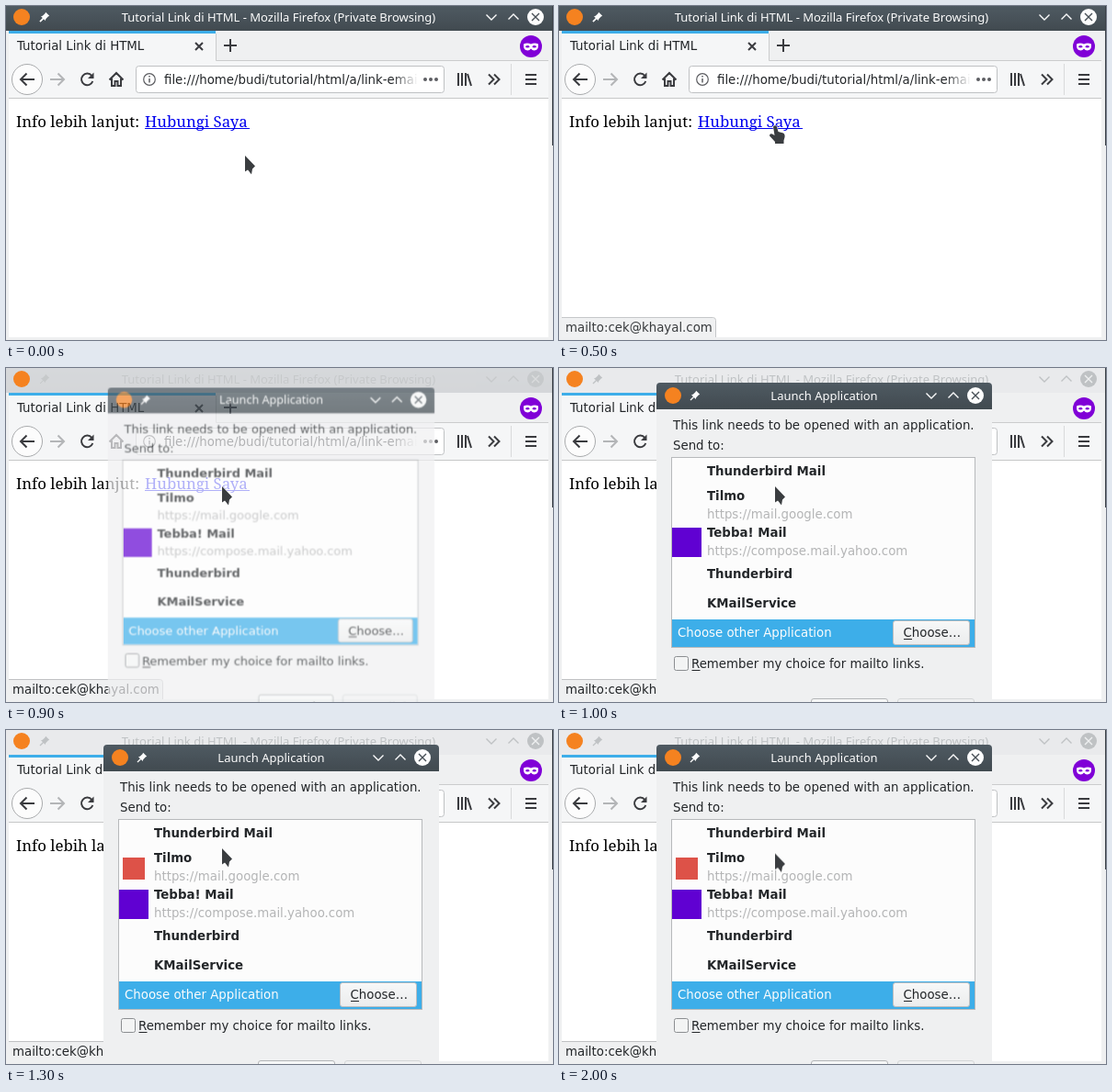
These frames come from a looping animation (595 px wide and 364 px high, 2.1 s). An HTML page:

```html
<!DOCTYPE html>
<html lang="id">
<head>
<meta charset="utf-8">
<title>Tutorial Link di HTML</title>
<style>
html, body { margin: 0; width: 100%; height: 100%; overflow: hidden; background: #eff0f1; }
svg { display: block; width: 595px; height: 364px; }
text { font: 13.33px "DejaVu Sans", sans-serif; fill: #232629; white-space: pre; }
.title { font: 13px "Noto Sans", sans-serif; fill: #fcfcfc; text-anchor: middle; }
.page { font: 16.8px "Noto Serif", serif; fill: #000; }
.link { fill: #00e; }
.bold { font-weight: bold; }
.url { fill: #b4b5b6; }
.light { fill: #fcfcfc; }
.icon { fill: none; stroke: #3a3b3f; stroke-width: 2; }
.deco { fill: none; stroke: #fcfcfc; stroke-width: 1.4; }
.faded .title { fill: #bfc2c4; }
.faded .deco { stroke: #bfc2c4; }
.pointer { fill: #3a3d40; stroke: #fff; stroke-width: 1.2; stroke-opacity: .85; paint-order: stroke; stroke-linejoin: round; }

/* Every change is a hard cut on a 100 ms grid. */
#arrow, #hand, #status, #dialog, #inactive, #mailIcon { animation: 2100ms step-end infinite; }
#arrow { animation-name: arrow; }
#hand { animation-name: hand; }
#status { animation-name: status; }
#dialog { animation-name: dialog; transform-origin: 288.5px 201px; }
#inactive { animation-name: inactive; }
#mailIcon { animation-name: mailIcon; }

@keyframes arrow {
  0% { transform: translate(260px, 163px); opacity: 1; }
  4.76% { transform: translate(249px, 143px); opacity: 1; }
  9.52% { transform: translate(235px, 129px); opacity: 0; }
  38.09% { transform: translate(235px, 129px); opacity: 1; }
  71.42% { transform: translate(235px, 130.5px); opacity: 1; }
  80.95% { transform: translate(235px, 131.5px); opacity: 1; }
  90.47% { transform: translate(235px, 133px); opacity: 1; }
  95.23%, 100% { transform: translate(235px, 134.5px); opacity: 1; }
}
@keyframes hand {
  0% { transform: translate(240px, 118px); opacity: 0; }
  9.52% { transform: translate(240px, 118px); opacity: 1; }
  14.28% { transform: translate(235px, 130px); opacity: 1; }
  38.09%, 100% { transform: translate(235px, 130px); opacity: 0; }
}
@keyframes status {
  0% { opacity: 0; }
  19.04% { opacity: .4; }
  23.8% { opacity: .9; }
  28.57%, 100% { opacity: 1; }
}
@keyframes dialog {
  0% { opacity: 0; transform: scale(.76); }
  38.09% { opacity: .012; transform: scale(.76); }
  42.85% { opacity: .7; transform: scale(.973); }
  47.61%, 100% { opacity: 1; transform: none; }
}
@keyframes inactive {
  0% { opacity: 0; }
  42.85% { opacity: .88; }
  47.61%, 100% { opacity: 1; }
}
@keyframes mailIcon {
  0% { opacity: 0; }
  57.14%, 100% { opacity: 1; }
}
</style>
</head>
<body>
<svg viewBox="0 0 595 364">
  <defs>
    <linearGradient id="bar" x2="0" y2="1">
      <stop stop-color="#4f5a62"/><stop offset="1" stop-color="#414a50"/>
    </linearGradient>
    <linearGradient id="btn" x2="0" y2="1">
      <stop stop-color="#f7f8f8"/><stop offset="1" stop-color="#ebeced"/>
    </linearGradient>
    <linearGradient id="fade">
      <stop stop-color="#fff" stop-opacity="0"/><stop offset="1" stop-color="#fff"/>
    </linearGradient>
    <g id="pin">
      <path d="M1.2-5.2 5.2-1.2 3.8-.4 1.2 2.2 .8 4-4 -.8 -2.2-1.2 .4-3.8Z"/>
      <path d="M-1.2 1.2-5 5" stroke-width="1.3"/>
    </g>
    <g id="arrows">
      <path class="deco" d="M-53.5-2.5-48 3-42.5-2.5M-29.5 2.5-24-3-18.5 2.5"/>
    </g>
  </defs>

  <rect width="595" height="364" fill="#eff0f1"/>

  <!-- Window title bar, active and inactive -->
  <g>
    <rect width="595" height="27" fill="url(#bar)"/>
    <use href="#pin" x="42" y="12" fill="#fcfcfc" stroke="#fcfcfc" stroke-width="0"/>
    <path d="M40.8 13.2 37 17" stroke="#fcfcfc" stroke-width="1.3"/>
    <text class="title" x="296.5" y="17">Tutorial Link di HTML - Mozilla Firefox (Private Browsing)</text>
    <use href="#arrows" x="576" y="12"/>
    <circle cx="576" cy="12" r="9" fill="#fcfcfc"/>
    <path d="M572 8l8 8m0-8-8 8" stroke="#474f56" stroke-width="1.4"/>
  </g>
  <g id="inactive" class="faded">
    <rect width="595" height="27" fill="#e9eaec"/>
    <use href="#pin" x="42" y="12" fill="#bfc2c4"/>
    <path d="M40.8 13.2 37 17" stroke="#bfc2c4" stroke-width="1.3"/>
    <text class="title" x="296.5" y="17">Tutorial Link di HTML - Mozilla Firefox (Private Browsing)</text>
    <path class="deco" d="M522.5 9.5 528 15 533.5 9.5M546.5 14.5 552 9 557.5 14.5"/>
    <circle cx="576" cy="12" r="9" fill="#bfc2c4"/>
    <path d="M572 8l8 8m0-8-8 8" stroke="#eff0f1" stroke-width="1.4"/>
  </g>
  <circle cx="17" cy="12" r="9" fill="#f58220"/>

  <!-- Tabs -->
  <rect x="3" y="27" width="225" height="33" fill="#f5f6f7"/>
  <rect x="3" y="27" width="225" height="3" fill="#3daee9"/>
  <path d="M228.5 30V59.5H590" fill="none" stroke="#cbcccd"/>
  <text x="12" y="48">Tutorial Link di HTML</text>
  <path class="icon" stroke-width="1.6" d="M206 40l8 8m0-8-8 8"/>
  <path class="icon" d="M237 43h14m-7-7v14"/>
  <circle cx="571" cy="44" r="12" fill="#8000d7"/>
  <path d="M563 41.5q4-2 8 0 4-2 8 0 .5 7-4.5 7-2 0-3.5-2-1.5 2-3.5 2-5 0-4.500-7Z" fill="#fff"/>
  <g fill="#8000d7"><ellipse cx="567.3" cy="44.3" rx="2" ry="1.3"/><ellipse cx="574.700" cy="44.300" rx="2" ry="1.3"/></g>

  <!-- Toolbar -->
  <rect x="3" y="60" width="587" height="40" fill="#f5f6f7"/>
  <path d="M3 100.500H590" stroke="#c6c7c8"/>
  <circle cx="23" cy="80" r="16.500" fill="#fcfcfc" stroke="#a9abad"/>
  <path class="icon" d="M31 80H16m6.500-6.500L16 80l6.500 6.500"/>
  <path class="icon" style="stroke:#b3b5b7" d="M48 80h15m-6.500-6.500L63 80l-6.500 6.500"/>
  <path class="icon" d="M93.300 76A6.300 6.300 0 1 0 94.300 82"/>
  <path d="M95.500 72.500v6.500H89Z" fill="#3a3b3f"/>
  <path class="icon" d="M112.500 80.500 120 73l7.500 7.500M115 79v8h3.500v-5h3v5h3.500v-8"/>
  <rect x="141.500" y="65.500" width="335" height="29" rx="3" fill="#fff" stroke="#bfc1c3"/>
  <circle cx="156" cy="80" r="6.300" fill="none" stroke="#5c5d61" stroke-width="1.200"/>
  <path d="M156 79v4.500M156 76v1.600" stroke="#5c5d61" stroke-width="1.500"/>
  <text x="172" y="85">file:///home/budi/tutorial/html/a/link-emai</text>
  <rect x="420" y="68" width="28" height="24" fill="url(#fade)"/>
  <g fill="#5c5d61"><circle cx="456" cy="80" r="2"/><circle cx="462" cy="80" r="2"/><circle cx="468" cy="80" r="2"/></g>
  <path class="icon" d="M492 73v14M496 73v14M500 73v14M502 74l4 13"/>
  <path class="icon" d="M525 74.500l5.500 5.500-5.500 5.500M531 74.500l5.500 5.500-5.500 5.500"/>
  <path d="M549.500 63V97" stroke="#d9dadb"/>
  <path class="icon" d="M565 75h12m-12 5h12m-12 5h12"/>

  <!-- Page -->
  <rect x="3" y="101" width="587" height="260" fill="#fff"/>
  <text class="page" x="11" y="132">Info lebih lanjut:</text>
  <text class="page link" x="151" y="132">Hubungi Saya</text>
  <path d="M151 133.500H265" stroke="#00e"/>
  <rect x="594" width="1" height="152" fill="#3a4046"/>

  <g id="status">
    <path d="M3 339.500H167.500q3 0 3 3V361H3Z" fill="#eff0f1"/>
    <path d="M3 339.500H167.500q3 0 3 3V361" fill="none" stroke="#bfc1c3"/>
    <text x="7" y="355">mailto:cek@khayal.com</text>
  </g>

  <g id="dialog">
    <path d="M106 386V20q0-4 4-4H467q4 0 4 4V386Z" fill="#eff0f1"/>
    <path d="M106 45V20q0-4 4-4H467q4 0 4 4V45Z" fill="url(#bar)"/>
    <circle cx="124" cy="30" r="9" fill="#f58220"/>
    <use href="#pin" x="148" y="30" fill="#fcfcfc"/>
    <path d="M146.800 31.200 143 35" stroke="#fcfcfc" stroke-width="1.300"/>
    <text class="title" x="288.500" y="35">Launch Application</text>
    <use href="#arrows" x="453" y="30"/>
    <circle cx="453" cy="30" r="9" fill="#fcfcfc"/>
    <path d="M449 26l8 8m0-8-8 8" stroke="#474f56" stroke-width="1.400"/>

    <text x="124" y="67">This link needs to be opened with an application.</text>
    <text x="124" y="89">Send to:</text>
    <rect x="122.500" y="97.500" width="330" height="207" fill="#fcfcfc" stroke="#b7b9bb"/>
    <text class="bold" x="161" y="117">Thunderbird Mail</text>
    <rect id="mailIcon" x="127" y="139" width="24" height="24" fill="#dd5248"/>
    <text class="bold" x="161" y="144">Tilmo</text>
    <text class="url" x="161" y="164">https://mail.google.com</text>
    <rect x="123" y="174" width="32" height="32" fill="#6001d2"/>
    <text class="bold" x="161" y="184">Tebba! Mail</text>
    <text class="url" x="161" y="204">https://compose.mail.yahoo.com</text>
    <text class="bold" x="161" y="229">Thunderbird</text>
    <text class="bold" x="161" y="261">KMailService</text>
    <rect x="123" y="274" width="329" height="30" fill="#3daee9"/>
    <text class="light" x="129" y="293">Choose other Application</text>
    <rect x="363.500" y="275.500" width="83" height="26" rx="2.500" fill="url(#btn)" stroke="#bcbec0"/>
    <text x="374.500" y="293">Choose…</text>
    <path d="M375 295.500h9M144.500 329.500h9" stroke="#232629"/>

    <rect x="125.500" y="314.500" width="15" height="15" rx="2" fill="#f3f4f4" stroke="#8b8e91"/>
    <text x="144" y="327">Remember my choice for mailto links.</text>
    <rect x="274.500" y="360.500" width="83" height="24" rx="2.500" fill="url(#btn)" stroke="#b3b5b7"/>
    <text x="293" y="379">Cancel</text>
    <rect x="368.500" y="360.500" width="83" height="24" rx="2.500" fill="#eff0f1" stroke="#d3d5d6"/>
    <text class="url" x="380" y="379">Open link</text>
  </g>

  <path id="arrow" class="pointer" d="M0 0V17.500L3 15.500 7 20.500 8 14.500 11 11.500Z"/>
  <path id="hand" class="pointer" d="M-2 1.500Q0-1 2 1.500L3.500 7 9 8.500Q11 9.500 10.500 13L9.500 16.500V20H0V18L-6 11.500Q-6 8.500-3 9.500L-.5 11Z"/>
</svg>
</body>
</html>
```
